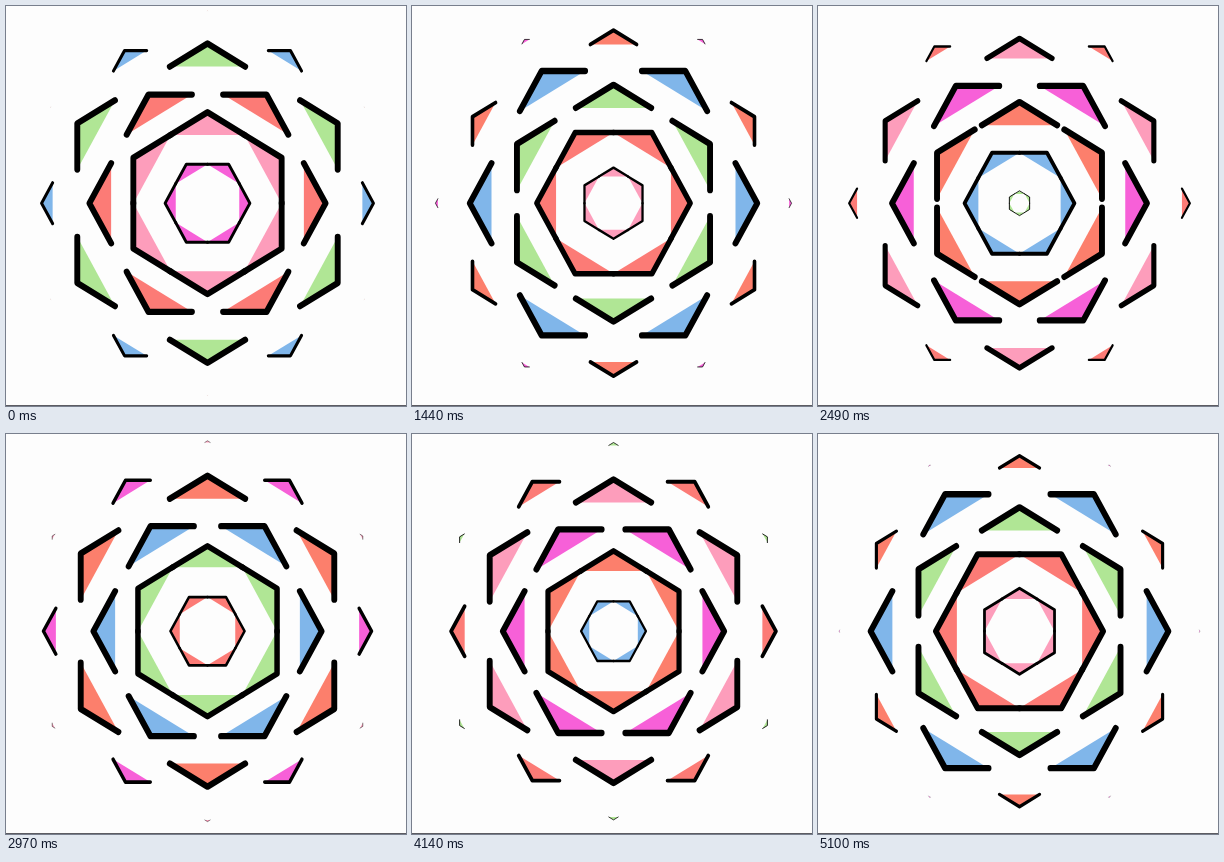
An HTML page with a canvas that plays this animation: 400 by 400 pixels, repeating every 5.13 s.

```html
<!DOCTYPE html>
<html lang="en">
<head>
<meta charset="utf-8">
<title>Expanding hexagon rings</title>
<style>
  html, body { margin: 0; width: 100%; height: 100%; overflow: hidden; background: #fdfdfd; }
  canvas { display: block; width: 400px; height: 400px; }
</style>
</head>
<body>
<canvas id="stage" width="400" height="400"></canvas>
<script>
const ctx = document.getElementById('stage').getContext('2d');

const LOOP = 5130, STEP = 30;
const CENTER = { x: 201.5, y: 197.2 };
const STRETCH = 1.062;
const ARM = 43.5, LINE = 5.9;
const COLORS = ['#f760d8', '#fd9dbb', '#fc7b76', '#b0e695', '#80b6ea', '#fc7f6c'];

// [ms, phase]: about one ring spacing every 300 ms
const PHASES = [[0, 0.98], [600, 2.91], [1440, 5.775], [1980, 7.585],
                [2970, 10.857], [4140, 14.75], [5100, 17.935], [5130, 18.035]];
// [age, distance of the chevron tips from the centre]
const RADII = [[0, 0], [2, 86.5], [4, 151], [6, 181.5]];

function lerpTable(table, x) {
  let i = 1;
  while (i < table.length - 1 && x > table[i][0]) i++;
  const [x0, y0] = table[i - 1], [x1, y1] = table[i];
  return y0 + (y1 - y0) * (x - x0) / (x1 - x0);
}

// Chevron pointing along +x, arms at 120 degrees to each other
function chevron(radius, size, color) {
  const arm = ARM * size;
  const back = radius - arm / 2, side = arm * Math.sqrt(3) / 2;
  ctx.beginPath();
  ctx.moveTo(back, -side);
  ctx.lineTo(radius, 0);
  ctx.lineTo(back, side);
  ctx.fillStyle = color;
  ctx.fill();
  ctx.lineWidth = LINE * size;
  ctx.stroke();
}

function ring(index, phase) {
  const age = (index + phase) % 6;
  const size = Math.min(age / 2, 1, (6 - age) / 2);
  if (size < 0.005) return;
  const radius = lerpTable(RADII, age);
  const turn = index % 2 ? Math.PI / 6 : 0;
  for (let k = 0; k < 6; k++) {
    ctx.save();
    ctx.rotate(turn + k * Math.PI / 3);
    chevron(radius, size, COLORS[index]);
    ctx.restore();
  }
}

function draw(ms) {
  ctx.fillStyle = '#fdfdfd';
  ctx.fillRect(0, 0, 400, 400);
  ctx.fillStyle = '#5c5c62';
  ctx.fillRect(0, 399, 400, 1);

  ctx.save();
  ctx.translate(CENTER.x, CENTER.y);
  ctx.scale(1, STRETCH);
  ctx.strokeStyle = '#000';
  ctx.lineCap = ctx.lineJoin = 'round';
  const phase = lerpTable(PHASES, ms);
  for (let i = 0; i < 6; i++) ring(i, phase);
  ctx.restore();
}

const start = performance.now();
function tick() {
  const t = (performance.now() - start) % LOOP;
  draw(Math.floor(t / STEP) * STEP);
  requestAnimationFrame(tick);
}
tick();
</script>
</body>
</html>
```
